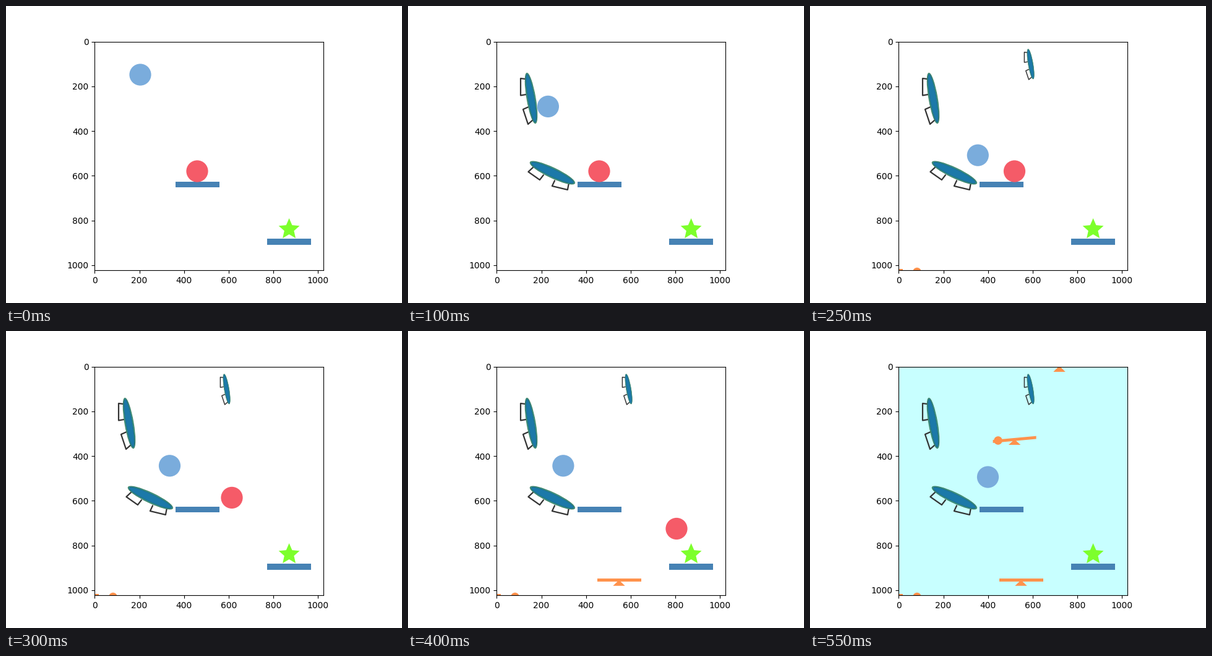
A matplotlib script that plays this animation: 640 px wide and 480 px high, repeating every 0.6 s.

```python
import numpy as np
import matplotlib.pyplot as plt
from matplotlib.animation import FuncAnimation
from matplotlib.patches import Circle, Ellipse, Polygon, Rectangle
from matplotlib.transforms import Affine2D

W, H, DPI = 640, 480, 100
FRAMES, STEP = 12, 50
BLUE, RED, ORANGE = "#7aacdc", "#f55b68", "#ff924c"
STEEL, GREEN, SKY = "#4682b4", "#7dff2c", "#c8ffff"
GOAL_STEP = 9

fig, ax = plt.subplots(figsize=(W / DPI, H / DPI), dpi=DPI)
ax.set_aspect("equal")
ax.set_xlim(-0.5, 1023.5)
ax.set_ylim(1023.5, -0.5)

# stage pixels with y pointing down
stage = Affine2D().scale(1, -1).translate(0, H)
items = []  # (artist, step at which it appears)


def add(patch, start=0, z=2.0):
    patch.set_transform(stage)
    patch.set_zorder(z)
    ax.add_artist(patch)
    patch.set_clip_path(ax.patch)
    items.append((patch, start))
    return patch


def fill(points, color, start=0, z=2.0):
    return add(Polygon(points, fc=color, lw=0), start, z)


def disc(x, y, r, color, start=0, z=2.0):
    return add(Circle((x, y), r, fc=color, lw=0), start, z)


def bar(x, y, w, h, color, start=0):
    return add(Rectangle((x, y), w, h, fc=color, lw=0), start)


def trampoline(center, a, b, angle, legs, start, scale=1.0):
    for leg in legs:
        pts = np.array(center) + scale * np.array(leg)
        add(Polygon(pts, closed=False, fill=False, ec="#333333",
                    lw=1.6 * scale ** 0.8, joinstyle="round"), start, 1.5)
    rim = 0.8 * scale
    size = 2 * scale * a, 2 * scale * b
    add(Ellipse(center, size[0] - 1, size[1] - 1, angle=angle,
                fc="#52b596", ec="#357a62", lw=rim), start, 1.6)
    add(Ellipse(center, size[0] - 5 * scale, size[1] - 4.6 * scale,
                angle=angle, fc="#1c79a9", ec="#1d6c86", lw=rim), start, 1.7)


def seesaw(x, y, start, rise=0.0, half=35.5, foot=9.2):
    """Plank centred on (x, y) over a triangular foot."""
    fill([(x, y), (x - 9.7, y + foot), (x + 9.7, y + foot)], ORANGE, start)
    fill([(x - half, y + rise - 2.4), (x + half, y - rise - 2.4),
          (x + half, y - rise + 2.4), (x - half, y + rise + 2.4)],
         ORANGE, start)


# platforms and goal
bar(274.2, 283.5, 70.8, 9.5, STEEL)
bar(422, 376, 70.8, 9.5, STEEL)
turn = np.arange(10) * np.pi / 5
radius = np.where(np.arange(10) % 2, 8.2, 17.8)
fill(np.c_[457.6 + radius * np.sin(turn), 360.8 - radius * np.cos(turn)],
     GREEN, z=5)

# tools, placed one after another
steep_legs = [[(-9, -31), (-17, -32), (-17, -4.5), (-8, -6)],
              [(-4, 14), (-13, 18), (-5, 42), (3, 35)]]
flat_legs = [[(-31, -9), (-39, -1.5), (-20.5, 11.5), (-14, 3)],
             [(4, 12), (-0.5, 21.5), (24.5, 27.5), (26.5, 17)]]
trampoline((199, 149), 41.6, 7.4, 80.3, steep_legs, 1)
trampoline((233.4, 269.5), 40.2, 8.5, 25.3, flat_legs, 2)
trampoline((356.6, 93.8), 41.6, 7.4, 80.3, steep_legs, 3, 0.6)
disc(173, 429.5, 6.7, ORANGE, 5)
bar(140, 425, 9.5, 5, ORANGE, 5)
seesaw(341, 402.6, 7)
seesaw(330.6, 175.3, GOAL_STEP, rise=3.2, half=35, foot=8.7)
disc(304, 177, 6.8, ORANGE, GOAL_STEP)
seesaw(403, 56.2, 10, foot=9.8)

blue = disc(217, 111, 17.6, BLUE, z=4)
red = disc(309, 267, 17.6, RED, z=4)


def blue_at(k):
    if k < 4:  # falls along the steep trampoline
        return 217 + 2.3 * k + 1.2 * k * k, 111 + 10.1 * k + 7.8 * k * k
    if k < 5:
        return 257.5, 255
    if k <= 9:  # recoils from the red ball
        return 264.5 - 6.8 * (k - 6), 210 + 7.8 * (k - 7) ** 2
    return 264.5 + 23 * (k - 10), 233 + 3 * (k - 10)


def red_at(k):
    if k < 5:
        return 309, 267
    x = 365 + 34.5 * (k - 6)
    if k < 6:
        return x, 267
    if k <= 9:
        d = k - 6
        return x, 269.4 + 17.7 * d + 3.67 * d * d
    return x, 352


def draw(k):
    ax.set_facecolor(SKY if k >= GOAL_STEP else "white")
    for artist, start in items:
        artist.set_visible(k >= start)
    blue.center = blue_at(k)
    red.center = red_at(k)
    return [artist for artist, _ in items]


anim = FuncAnimation(fig, draw, frames=FRAMES, interval=STEP,
                     repeat=True, repeat_delay=0, blit=False)
plt.show()
```
